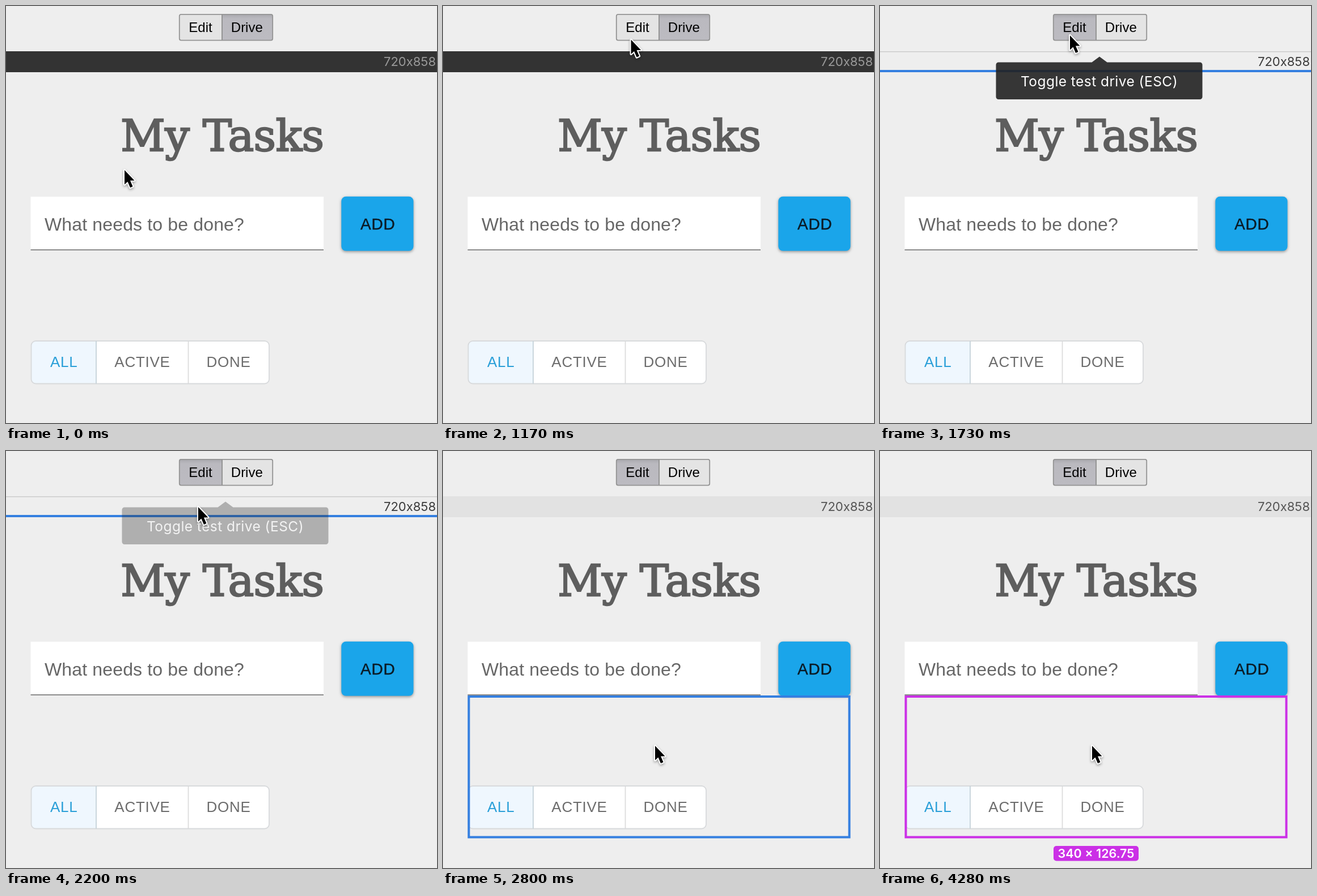
These frames come from a looping animation (760 by 737 pixels, 4.33 s). An HTML page:

```html
<!DOCTYPE html>
<html lang="en">
<head>
<meta charset="utf-8">
<title>My Tasks</title>
<style>
  html, body { margin: 0; width: 100%; height: 100%; overflow: hidden; background: #eee; }
  svg { display: block; width: 760px; height: 737px; }
  text { font-family: "Liberation Sans", Arial, sans-serif; white-space: pre; }
  .ui { font-family: Inter, sans-serif; }
  .mode { font-size: 24px; }
  .title { font: 77px "DejaVu Serif", serif; letter-spacing: -.7px; fill: #5e5e5e; stroke: #5e5e5e; stroke-width: 2.4px; }
  .filter { font-size: 26px; letter-spacing: .74px; fill: #6c6c6c; }
  .add { filter: drop-shadow(0 2px 2px rgba(0, 0, 0, .28)) drop-shadow(0 1px 3px rgba(0, 0, 0, .12)); }
  #cursor { filter: drop-shadow(0 2px 2px rgba(0, 0, 0, .35)); }
</style>
</head>
<body>
<svg viewBox="0 0 760 737">
  <defs>
    <linearGradient id="pressed" x2="0" y2="1">
      <stop stop-color="#a9a9ae"/>
      <stop offset=".16" stop-color="#bab9bf"/>
      <stop offset="1" stop-color="#bcbbc1"/>
    </linearGradient>
  </defs>
  <rect width="760" height="737" fill="#eee"/>

  <!-- mode switch -->
  <rect id="editButton" x="306" y="15" width="75" height="46"/>
  <rect id="driveButton" x="381" y="15" width="89" height="46"/>
  <path d="M381 15V61" stroke="#949494" stroke-width="2"/>
  <rect x="305.8" y="14.8" width="164.4" height="45.8" rx="3" fill="none" stroke="#949494" stroke-width="1.8"/>
  <text class="mode" x="322.3" y="46">Edit</text>
  <text class="mode" x="396.8" y="46">Drive</text>

  <!-- artboard header -->
  <rect id="strip" y="80" width="760" height="37"/>
  <g id="armed">
    <rect y="80" width="760" height="1.5" fill="#cbcbcb"/>
    <rect y="113" width="760" height="4" fill="#347fe0"/>
  </g>
  <rect id="bodyOutline" y="117" width="760" height="4" fill="#347fe0"/>
  <text id="size" class="ui" x="758" y="106" font-size="22" text-anchor="end">720x858</text>

  <!-- task page -->
  <text class="title" x="202" y="256">My Tasks</text>
  <rect x="43.5" y="337" width="516.5" height="95" fill="#fff"/>
  <rect x="43.5" y="430" width="516.5" height="2" fill="#8c8c8c"/>
  <text x="68" y="396.5" font-size="32" letter-spacing=".15" fill="#666">What needs to be done?</text>
  <rect class="add" x="591.3" y="336.8" width="127.2" height="96" rx="8" fill="#1aa5ea"/>
  <text x="625" y="394.5" font-size="28" letter-spacing=".8" fill="#0b1a24" stroke="#0b1a24" stroke-width=".4">ADD</text>

  <rect x="44.5" y="592" width="419.5" height="75.5" rx="8" fill="#fff"/>
  <path d="M159 592H52.5a8 8 0 0 0-8 8V659.5a8 8 0 0 0 8 8H159Z" fill="#eff7fe"/>
  <path d="M321.5 592V667.5" stroke="#dcdcdc" stroke-width="1.8"/>
  <rect x="44.5" y="592" width="419.5" height="75.5" rx="8" fill="none" stroke="#d8dadc" stroke-width="1.8"/>
  <path d="M159 592V667.5" stroke="#c6d2da" stroke-width="1.8"/>
  <text class="filter" x="78" y="638" style="fill:#2a9fd8">ALL</text>
  <text class="filter" x="191.3" y="638">ACTIVE</text>
  <text class="filter" x="353.6" y="638">DONE</text>

  <!-- element highlight -->
  <rect id="listOutline" x="45.5" y="434" width="671" height="248.5" fill="none" stroke-width="4"/>
  <g id="badge">
    <rect x="306" y="698" width="150" height="26.5" rx="5" fill="#cb30e6"/>
    <text class="ui" x="381" y="719" font-size="21.5" font-weight="600" fill="#fff" text-anchor="middle">340 × 126.75</text>
  </g>

  <g id="tooltip">
    <path d="M209 99.5H373.5L387 89.5 400.5 99.5H564a4.5 4.5 0 0 1 4.5 4.5V160.5a4.5 4.5 0 0 1-4.5 4.5H209a4.5 4.5 0 0 1-4.5-4.5V104a4.5 4.5 0 0 1 4.5-4.5Z" fill="#222" fill-opacity=".9"/>
    <text class="ui" x="386.5" y="142" font-size="24.5" letter-spacing=".45" fill="#fff" text-anchor="middle">Toggle test drive (ESC)</text>
  </g>

  <path id="cursor" d="M0 0V25.5L5.5 20.5 10 31 14.5 29 10 18.5H17.5Z"
        stroke="#fff" stroke-width="4" stroke-linejoin="round" paint-order="stroke"/>
</svg>
<script>
const LOOP = 4330;
const CLICK = 1470, LEAVE = 2122, ENTER_BODY = 2230, ENTER_LIST = 2598, SELECT = 3230;
// start time, end time, start point, end point
const moves = [
  [685, 1215, [208, 288], [333, 53]],
  [1215, 1300, [333, 53], [334, 50]],
  [2055, 2800, [334, 50], [373, 519]],
];

const $ = id => document.getElementById(id);
const progress = (t, from, to) => Math.min(1, Math.max(0, (t - from) / (to - from)));
const smooth = p => p * p * (3 - 2 * p);
const easeOut = p => 1 - (1 - p) ** 3;
const show = (id, on) => $(id).setAttribute('visibility', on ? 'visible' : 'hidden');
const paint = (id, color, attr = 'fill') => $(id).setAttribute(attr, color);

function pointer(t) {
  const [start, end, a, b] = moves.findLast(m => t >= m[0]) || moves[0];
  const p = smooth(progress(t, start, end));
  return a.map((v, i) => v + (b[i] - v) * p);
}

function render(t) {
  const editing = t >= CLICK;
  const onBody = t >= ENTER_BODY;
  const onList = t >= ENTER_LIST;
  const selected = t >= SELECT;

  paint('editButton', editing ? 'url(#pressed)' : '#e4e4e4');
  paint('driveButton', editing ? '#e4e4e4' : 'url(#pressed)');
  paint('strip', !editing ? '#333' : onBody ? '#e2e2e2' : '#eee');
  paint('size', !editing ? '#999' : onBody ? '#555' : '#3c3c3c');
  show('armed', editing && !onBody);
  show('bodyOutline', onBody && !onList);
  show('listOutline', onList);
  paint('listOutline', selected ? '#cb30e6' : '#347fe0', 'stroke');
  show('badge', selected);

  const fadeIn = easeOut(progress(t, CLICK, CLICK + 280));
  const fadeOut = easeOut(progress(t, LEAVE, LEAVE + 260));
  $('tooltip').setAttribute('opacity', fadeIn - fadeOut);

  const [x, y] = pointer(t);
  $('cursor').setAttribute('transform', `translate(${x + 1} ${y + 2})`);
}

const began = performance.now();
function tick() {
  render((performance.now() - began) % LOOP);
  requestAnimationFrame(tick);
}
tick();
</script>
</body>
</html>
```
